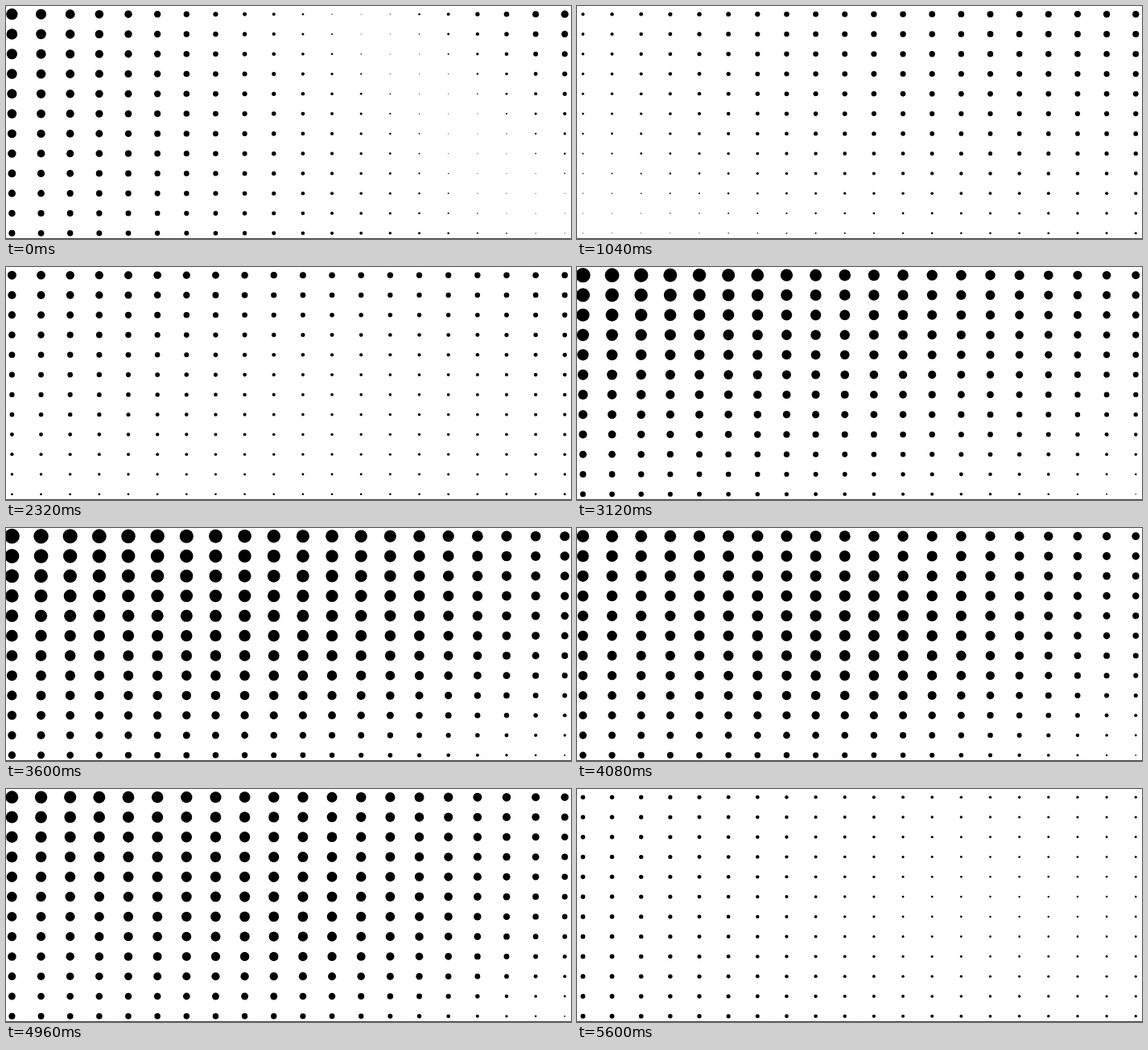
An HTML page with a canvas that plays this animation: 702 px wide and 290 px high, repeating every 5.68 s.

```html
<!DOCTYPE html>
<html lang="en">
<head>
<meta charset="utf-8">
<title>Dot field</title>
<style>
  html, body { margin: 0; width: 100%; height: 100%; overflow: hidden; background: #fff; }
  canvas { display: block; }
</style>
</head>
<body>
<canvas id="stage" width="702" height="290"></canvas>
<script>
const ctx = document.getElementById('stage').getContext('2d');
const LOOP = 5680, STEP = 80, COLS = 20, ROWS = 12;

// Key moments of a slanted sheet with one hill or dip on it.
// Corners give the signed dot radius, x and y place the hill (0..1).
const pose = (t, tl, tr, bl, br, x, y, height) => ({ t, v: [tl, tr, bl, br, x, y, height] });
const poses = [
  pose(0, 7, -4.9, 4, .3, .6, .4, 1.1),
  pose(1040, 1.9, 4.1, .2, 1.5, .5, .35, 1),
  pose(2320, 5.6, 4.4, 1.4, 1.6, .65, .3, -1.6),
  pose(3120, 9.1, 4.8, 3.5, .4, .75, .55, 1),
  pose(3600, 9.3, 5.7, 4.6, .5, .65, .55, 2.4),
  pose(4080, 7.5, 4.5, 4.1, .3, .6, .55, 3.1),
  pose(4960, 7.8, 4.6, 3.8, .2, .6, .65, 2.8),
  pose(5600, 2.8, 1.8, 3, 1.9, .7, .5, -.9)
];

const lerp = (a, b, k) => a + (b - a) * k;

// Slope of one value at pose i, taken across its neighbours
function slope(i, k) {
  const a = poses[Math.max(i - 1, 0)], b = poses[Math.min(i + 1, poses.length - 1)];
  return (b.v[k] - a.v[k]) / (b.t - a.t);
}

// Smooth Hermite path through the poses
function valuesAt(t) {
  let i = 0;
  while (i < poses.length - 2 && t >= poses[i + 1].t) i++;
  const a = poses[i], b = poses[i + 1], span = b.t - a.t;
  const s = (t - a.t) / span, ease = s * s * (3 - 2 * s);
  const leave = s * (1 - s) * (1 - s) * span, arrive = s * s * (1 - s) * span;
  return a.v.map((from, k) =>
    lerp(from, b.v[k], ease) + leave * slope(i, k) - arrive * slope(i + 1, k));
}

function radius(u, v, [tl, tr, bl, br, x, y, height]) {
  const sheet = lerp(lerp(tl, tr, u), lerp(bl, br, u), v);
  const hill = height * Math.exp(-(((u - x) / .42) ** 2) - ((v - y) / .5) ** 2);
  return Math.max(.5, Math.abs(sheet + hill));
}

function draw(t) {
  const values = valuesAt(t);
  ctx.fillStyle = '#fff';
  ctx.fillRect(0, 0, 702, 290);
  ctx.fillStyle = '#000';
  for (let row = 0; row < ROWS; row++) {
    for (let col = 0; col < COLS; col++) {
      const r = radius(col / (COLS - 1), row / (ROWS - 1), values);
      ctx.beginPath();
      ctx.arc(7.4 + col * 36.15, 10.2 + row * 24.78, r, 0, Math.PI * 2);
      ctx.fill();
    }
  }
  ctx.fillStyle = '#444';
  ctx.fillRect(0, 289, 702, 1);
}

const start = performance.now();
function tick() {
  const t = (performance.now() - start) % LOOP;
  draw(Math.floor(t / STEP) * STEP);
  requestAnimationFrame(tick);
}
tick();
</script>
</body>
</html>
```
